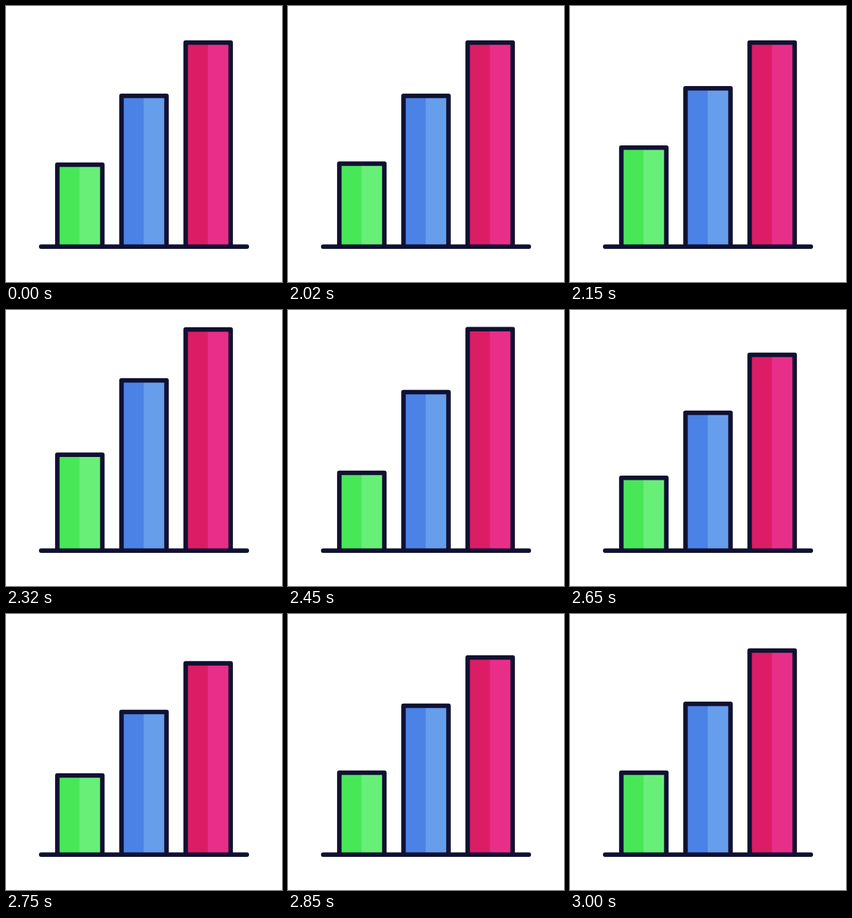
An HTML page that plays this animation: 400x400 px, repeating every 3.02 s.

```html
<!DOCTYPE html>
<html lang="en">
<head>
<meta charset="utf-8">
<title>Bar chart</title>
<style>
  html, body { margin: 0; width: 100%; height: 100%; overflow: hidden; background: #fff; }
  svg { display: block; width: 100%; height: 100%; }
  .line { fill: none; stroke: #111132; stroke-width: 6.5; stroke-linecap: round; stroke-linejoin: round; }
</style>
</head>
<body>
<svg id="stage" viewBox="0 0 400 400"></svg>
<script>
const LOOP = 3020, START = 2000, STAGGER = 83.3;
const BASE = 348.7, HALF = 32.6;

const bars = [
  { x: 107, top: 229.9, left: '#48e758', right: '#68ef78' },
  { x: 200, top: 130.3, left: '#4a82e6', right: '#669eeb' },
  { x: 293, top: 53, left: '#dc1d66', right: '#e92e8a' }
];

// Lift of a bar: up, down past rest, back. x1 and x2 are the easing handles.
const moves = [
  { time: 233, from: 0, to: 28.2, x1: 0.21, x2: 0.38 },
  { time: 334, from: 28.2, to: -18.8, x1: 0.333, x2: 0.645 },
  { time: 266, from: -18.8, to: 0, x1: 0.21, x2: 0.69 }
];

const stage = document.getElementById('stage');

function add(name, attrs) {
  const node = document.createElementNS('http://www.w3.org/2000/svg', name);
  for (const key in attrs) node.setAttribute(key, attrs[key]);
  return stage.appendChild(node);
}

// Cubic bezier easing with flat ends, solved by bisection.
function ease(x, x1, x2) {
  let low = 0, high = 1;
  for (let i = 0; i < 24; i++) {
    const u = (low + high) / 2, v = 1 - u;
    if (3 * x1 * u * v * v + 3 * x2 * u * u * v + u * u * u < x) low = u;
    else high = u;
  }
  return low * low * (3 - 2 * low);
}

function lift(t) {
  if (t <= 0) return 0;
  for (const m of moves) {
    if (t < m.time) return m.from + (m.to - m.from) * ease(t / m.time, m.x1, m.x2);
    t -= m.time;
  }
  return 0;
}

// The motion advances in alternating steps of 30 and 20 ms.
function stepped(t) {
  const rest = (t - 20) % 50;
  return t < 20 ? 0 : t - rest + (rest >= 30 ? 30 : 0);
}

for (const bar of bars) {
  bar.parts = [
    add('rect', { x: bar.x - HALF, width: HALF, fill: bar.left }),
    add('rect', { x: bar.x - 0.4, width: HALF, fill: bar.right })
  ];
  bar.outline = add('path', { class: 'line' });
}
add('path', { class: 'line', d: `M51 ${BASE}H349` });

function draw(time) {
  const t = stepped(time % LOOP);
  bars.forEach((bar, i) => {
    const y = bar.top - lift(t - START - i * STAGGER);
    for (const part of bar.parts) {
      part.setAttribute('y', y);
      part.setAttribute('height', BASE - y);
    }
    bar.outline.setAttribute('d', `M${bar.x - HALF} ${BASE}V${y}h${2 * HALF}V${BASE}`);
  });
}

const begin = performance.now();
function tick() {
  draw(performance.now() - begin);
  requestAnimationFrame(tick);
}
tick();
</script>
</body>
</html>
```
